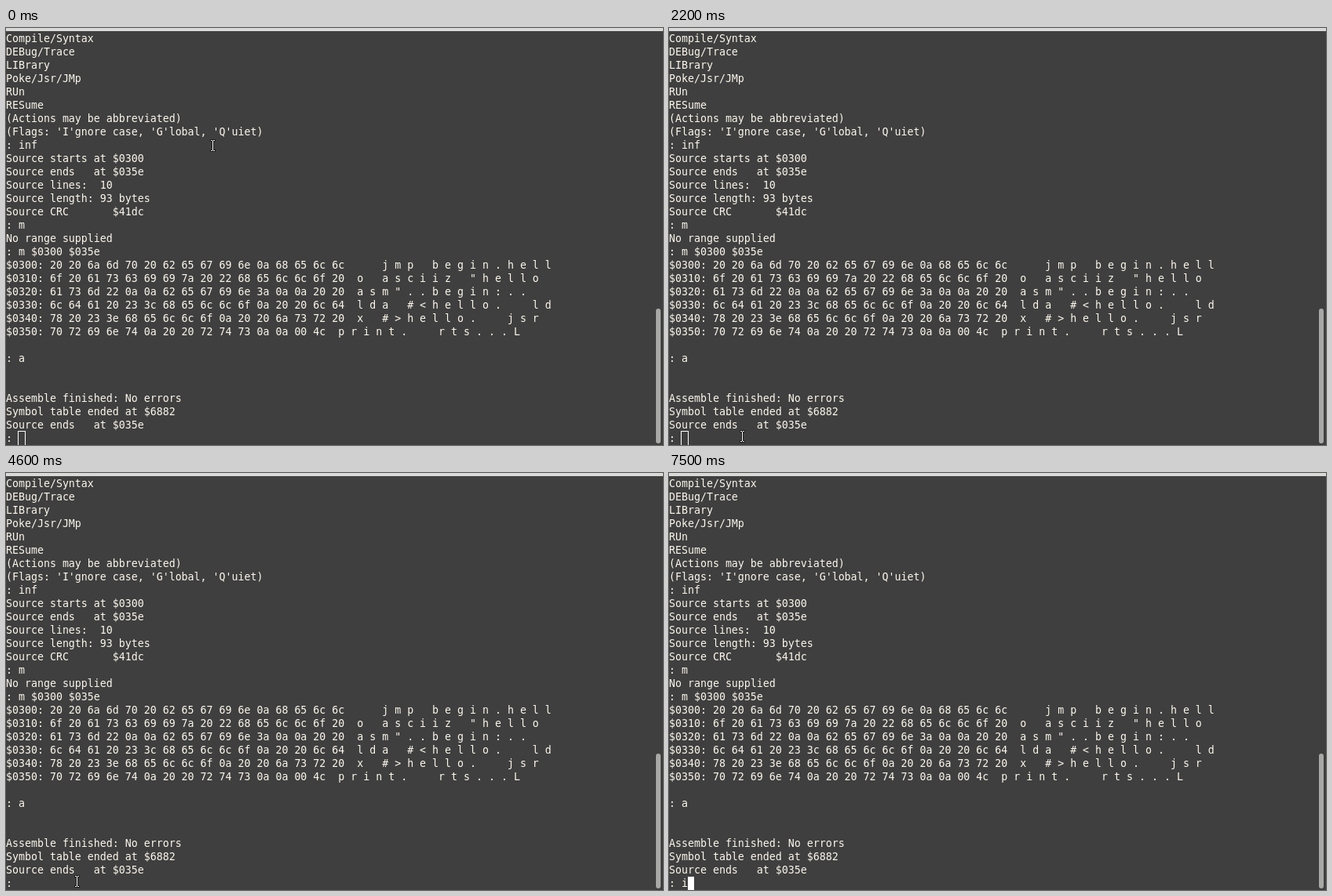
Recreate the animation shown at these times as an HTML page. Size 837 by 532 pixels, loop 8 s.

```html
<!DOCTYPE html>
<html lang="en">
<head>
<meta charset="utf-8">
<title>Terminal</title>
<style>
  html, body {
    margin: 0;
    width: 100%;
    height: 100%;
    overflow: hidden;
    background: #3f3f3f;
  }
  .stage {
    position: relative;
    width: 837px;
    height: 532px;
    overflow: hidden;
  }
  .stage > * { position: absolute; }
  .edge {
    left: 0;
    top: 0;
    width: 100%;
    height: 4px;
    background: #d9dad7;
  }
  .scroll {
    left: 828px;
    top: 358px;
    width: 6px;
    height: 172px;
    border-radius: 3px;
    background: #a8a8a6;
  }
  pre {
    left: 0;
    top: 5px;
    margin: 0;
    font: 13.288px/17px "DejaVu Sans Mono", monospace;
    color: #fcf8ec;
  }

  /* Every part shares one 8 s clock with hard changes. */
  .typed, .outline, .block, .pointer { animation: 8s step-end infinite; }

  .typed { animation-name: typed; }
  .outline {
    left: 15px;
    top: 514px;
    width: 8px;
    height: 17px;
    border: 1px solid #fff;
    animation-name: outline;
  }
  .block {
    left: 16px;
    top: 515px;
    width: 8px;
    height: 17px;
    background: #fff;
    animation-name: block;
  }
  .pointer {
    left: 0;
    top: 0;
    width: 7px;
    height: 16px;
    animation-name: pointer;
  }

  @keyframes typed {
    0% { opacity: 0; }
    93.75%, 100% { opacity: 1; }
  }
  @keyframes outline {
    0% { opacity: 1; }
    35%, 100% { opacity: 0; }
  }
  @keyframes block {
    0%, 43.75%, 57.5%, 72.5%, 87.5% { opacity: 0; transform: none; }
    35%, 50%, 65%, 80%, 92.5% { opacity: 1; transform: none; }
    93.75%, 100% { opacity: 1; transform: translateX(8px); }
  }
  @keyframes pointer {
    0% { transform: translate(260px, 142px); opacity: 1; }
    7.5% { transform: translate(257px, 152px); }
    8.75% { transform: translate(243px, 190px); }
    10% { transform: translate(235px, 211px); }
    21.25% { transform: translate(229px, 225px); }
    22.5% { transform: translate(206px, 273px); }
    23.75% { transform: translate(170px, 347px); }
    25% { transform: translate(131px, 428px); }
    26.25% { transform: translate(104px, 488px); }
    27.5% { transform: translate(90px, 513px); }
    28.75% { transform: translate(88px, 515px); }
    30% { transform: translate(87px, 515px); }
    35% { transform: translate(87px, 513px); opacity: 1; }
    92.5%, 100% { transform: translate(87px, 513px); opacity: 0; }
  }
</style>
</head>
<body>
<div class="stage">
  <div class="edge"></div>
<pre>
Compile/Syntax
DEBug/Trace
LIBrary
Poke/Jsr/JMp
RUn
RESume
(Actions may be abbreviated)
(Flags: 'I'gnore case, 'G'lobal, 'Q'uiet)
: inf
Source starts at $0300
Source ends   at $035e
Source lines:  10
Source length: 93 bytes
Source CRC       $41dc
: m
No range supplied
: m $0300 $035e
$0300: 20 20 6a 6d 70 20 62 65 67 69 6e 0a 68 65 6c 6c      j m p   b e g i n . h e l l
$0310: 6f 20 61 73 63 69 69 7a 20 22 68 65 6c 6c 6f 20  o   a s c i i z   " h e l l o
$0320: 61 73 6d 22 0a 0a 62 65 67 69 6e 3a 0a 0a 20 20  a s m " . . b e g i n : . .
$0330: 6c 64 61 20 23 3c 68 65 6c 6c 6f 0a 20 20 6c 64  l d a   # &lt; h e l l o .     l d
$0340: 78 20 23 3e 68 65 6c 6c 6f 0a 20 20 6a 73 72 20  x   # &gt; h e l l o .     j s r
$0350: 70 72 69 6e 74 0a 20 20 72 74 73 0a 0a 00 4c  p r i n t .     r t s . . . L

: a


Assemble finished: No errors
Symbol table ended at $6882
Source ends   at $035e
: <span class="typed">i</span></pre>
  <div class="scroll"></div>
  <div class="outline"></div>
  <div class="block"></div>
  <svg class="pointer" viewBox="0 0 7 16">
    <path d="M0 0H7V3H5V13H7V16H0V13H2V3H0Z" fill="#1c1c1c"/>
    <path d="M1 1.5H3M4 1.5H6M3.5 2V14M1 14.5H3M4 14.5H6" stroke="#fff" fill="none"/>
  </svg>
</div>
</body>
</html>
```
